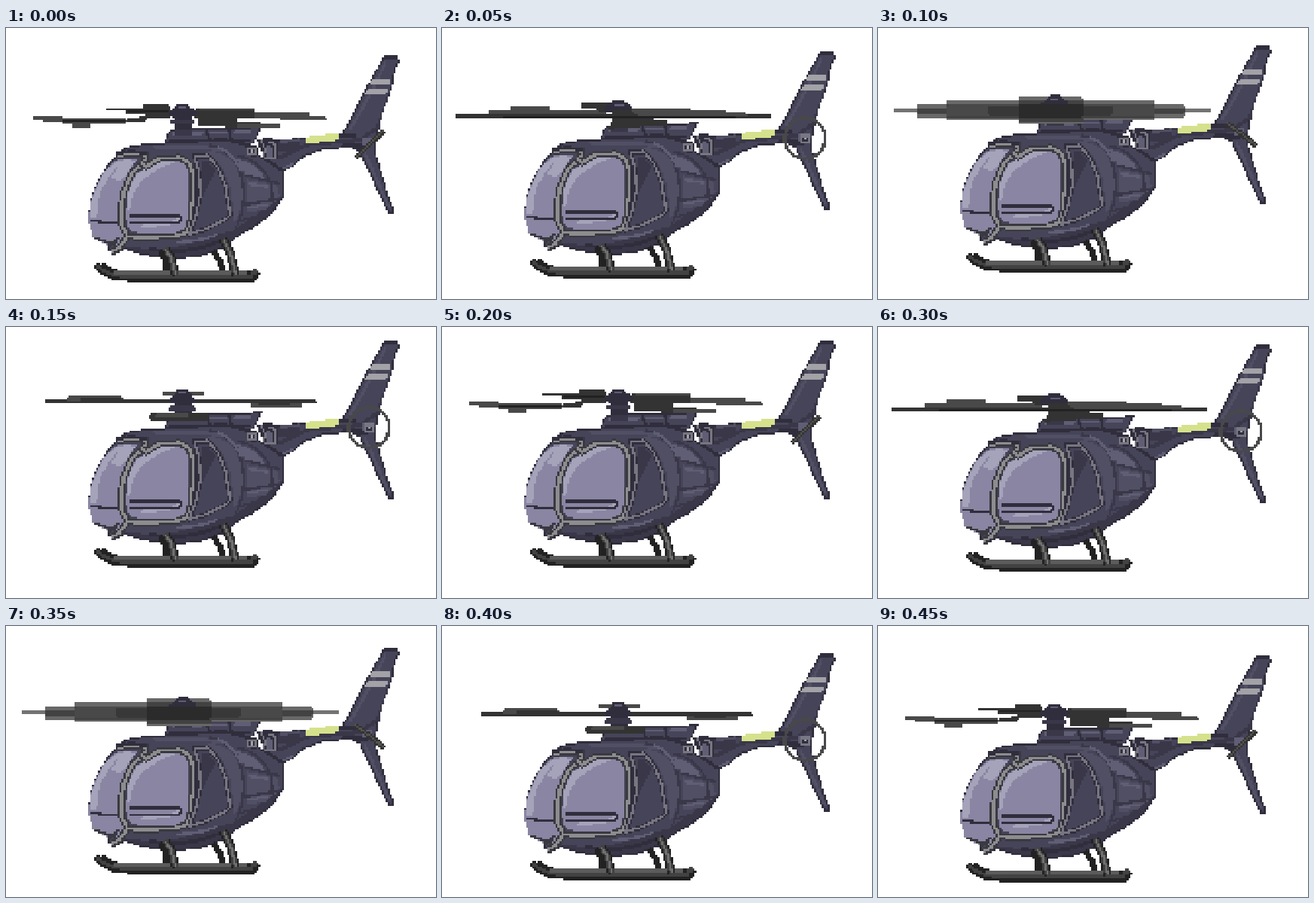
Animation of 571x360 px, one loop 500 ms. Source, as an HTML page with a canvas:

```html
<!DOCTYPE html>
<html lang="en">
<head>
<meta charset="utf-8">
<title>Helicopter</title>
<style>
html, body { margin: 0; width: 100%; height: 100%; overflow: hidden; background: #fff; }
canvas { display: block; }
</style>
</head>
<body>
<canvas id="stage" width="571" height="360"></canvas>
<script>
const CELL = 2.6, COLS = 220, ROWS = 144;
const STEP = 50;
const LIFT = [0, -2, -5, -7, -7, -6, -5, -3, 0, 1];
const SPIN = ['star', 'wide', 'blur', 'flat', 'star'];
const TAIL = { star: 'rise', wide: 'ring', blur: 'fall', flat: 'ring' };

const C = {
  edge: '#302e3c', dark: '#393748', body: '#464458', mid: '#514f63', light: '#605e74',
  glass: '#8985a2', shine: '#a5a3ba', frame: '#8d8d8f', rim: '#393940', seam: '#777681',
  black: '#222222', metal: '#424242', steel: '#5b5b5b', blade: '#333333', bladeLight: '#494949',
  band: '#a2a2a7', lime: '#d6e18c'
};

function makeCanvas() {
  const canvas = document.createElement('canvas');
  canvas.width = COLS;
  canvas.height = ROWS;
  return canvas;
}

const scratch = makeCanvas();
const pen = scratch.getContext('2d', { willReadFrequently: true });

// Draws a path with hard, un-antialiased cells.
function layer(draw) {
  const canvas = makeCanvas(), out = canvas.getContext('2d');
  const stamp = (color, path, width, inside) => {
    pen.setTransform(1, 0, 0, 1, 0, 0);
    pen.clearRect(0, 0, COLS, ROWS);
    pen.scale(1 / CELL, 1 / CELL);
    pen.lineJoin = 'round';
    pen.fillStyle = pen.strokeStyle = color;
    const shape = new Path2D(path);
    if (width) {
      pen.lineWidth = width;
      pen.stroke(shape);
    } else pen.fill(shape);
    const image = pen.getImageData(0, 0, COLS, ROWS), px = image.data;
    const [r, g, b] = [1, 3, 5].map(i => parseInt(color.slice(i, i + 2), 16));
    for (let i = 0; i < px.length; i += 4) {
      if (px[i + 3] > 115) {
        px[i] = r; px[i + 1] = g; px[i + 2] = b; px[i + 3] = 255;
      } else px[i + 3] = 0;
    }
    pen.putImageData(image, 0, 0);
    out.globalCompositeOperation = inside ? 'source-atop' : 'source-over';
    out.drawImage(scratch, 0, 0);
  };
  draw({
    fill: (color, path) => stamp(color, path),
    line: (color, path, width) => stamp(color, path, width),
    shade: (color, path, width) => stamp(color, path, width, true),
    box: (color, x1, y1, x2, y2) => stamp(color, `M${x1} ${y1}H${x2}V${y2}H${x1}Z`)
  });
  return canvas;
}

function drawTail({ fill, line, shade }) {
  const fin = 'M501 38H520L523 45L517 54L514 75L508 92L499 115L495 135L490 162L500 197L511 233L515 239V247H508L499 228L484 196L469 164L458 159H446L420 162L396 171L382 184L366 192L340 186L344 149L396 146L447 139L455 125L469 98L481 74L493 53Z';
  fill(C.body, fin);
  shade(C.edge, fin, 4);
  shade(C.mid, 'M504 46L488 79L465 121L456 135', 4);
  shade(C.dark, 'M508 92L494 132L470 149L400 155L360 174', 5);
  shade(C.mid, 'M476 165L493 203L509 240', 4);
  fill(C.edge, 'M440 140H466V144H440ZM444 153H482V160H460Z');
  fill(C.light, 'M474 146H486V156H474Z');
  fill(C.band, 'M486 69H511L509 76H482ZM480 81H507L504 89H476Z');
  fill(C.lime, 'M398 145L441 140V149L415 152H398Z');
  line(C.light, 'M366 187L382 180', 3);
}

function drawCowl({ fill, line, shade, box }) {
  const cowl = 'M210 153L215 139L224 134H266L296 132H325L341 129L335 142L329 154L300 158H215Z';
  fill(C.body, cowl);
  shade(C.edge, cowl, 4);
  line(C.light, 'M221 140H262M270 139H293M302 138H326', 3);
  line(C.edge, 'M266 135L271 151M296 134L300 151M215 149H326', 3);
  box(C.dark, 224, 134, 246, 143);
}

function drawHull({ fill, line, shade }) {
  const hull = 'M147 168L160 158L185 154L240 151L290 148L317 154L341 172L368 190L370 222L352 248L332 263L306 278L291 291L257 304L215 307L180 301L159 294L146 300L136 296L137 289L116 278L110 255L111 233L119 210L132 185Z';
  fill(C.body, hull);
  shade(C.dark, 'M155 290Q220 300 266 278L301 270L368 223V260L290 310H155Z');
  shade(C.edge, hull, 4);
  shade(C.mid, 'M266 164Q290 164 303 181L315 207L314 235L303 260L299 214L286 183Z');
  shade(C.light, 'M306 174Q326 177 337 191L347 203L319 195Z');
  shade(C.mid, 'M319 201L361 210L363 224L348 240L319 246Z');
  line(C.dark, 'M270 155Q298 163 309 184Q321 217 311 253L302 274M307 170Q333 172 351 202L355 233L344 248M316 195L365 207M315 235L361 227M310 256L340 249', 3);
  line(C.light, 'M280 157Q302 167 313 191M323 207L350 211M321 239L348 234', 3);
  shade(C.mid, 'M196 158H262L285 163', 4);
  line(C.edge, 'M190 293Q240 303 286 282', 4);
  line(C.light, 'M227 284Q257 284 281 274', 3);
}

function drawMount({ fill, line, box }) {
  fill(C.edge, 'M333 148L351 145L360 151L361 175L342 171Z');
  line(C.seam, 'M338 148L344 160L342 171M349 151L357 155V174M343 173H357', 3);
  fill(C.light, 'M347 155L354 159V171H346Z');
  box(C.dark, 362, 151, 391, 163);
  line(C.mid, 'M364 151L390 149', 4);
  fill(C.edge, 'M319 159L325 156H332L336 162V168L329 172L321 169Z');
  line(C.seam, 'M322 160H332V168H322Z', 3);
  line(C.band, 'M327 162V166', 3);
}

function drawCabin({ fill, line }) {
  const nose = 'M148 175L176 173L163 190L154 215L152 243L154 264L160 277L151 289L138 290L116 278L110 258L111 235L119 212L131 189Z';
  const pane = 'M190 183L206 175L226 174L239 181L242 194V246L238 265L226 273L174 272L163 267L159 249L162 217L172 194Z';
  fill(C.glass, nose);
  fill(C.shine, 'M148 176L168 175L151 198L134 201L123 226L120 253H112V235L120 212L132 190Z');
  fill(C.glass, 'M148 183L137 198L126 216L121 249L127 268L152 264V225Z');
  fill(C.shine, 'M157 176H172L158 196L151 205L139 198Z');
  fill(C.glass, pane);
  fill(C.shine, 'M190 184L206 176H226L217 181L198 190L181 202L169 220L165 241H160L163 214L173 195Z');
  line(C.shine, 'M180 263L215 262L235 251', 3);
  line(C.edge, 'M111 256L153 260M163 250H232M164 258H230L234 251', 3);
  line(C.rim, 'M117 278L138 286L151 279M134 291L147 284', 3);
  const front = 'M148 169L165 167L186 168L185 179L169 190Q153 215 153 245L154 263L162 276L152 290L140 298';
  const window = 'M162 276L174 278L223 277L240 272L246 256L248 229V194L244 180L231 172L205 173L186 184L179 179';
  for (const path of [front, window]) {
    line(C.rim, path, 9);
    line(C.frame, path, 4);
  }
  line(C.edge, 'M146 167L166 164L188 167', 4);
  line(C.edge, 'M251 176L253 211L249 252L242 275', 4);
  const door = 'M250 170L268 169L282 186L291 209L298 248L290 255L263 268L243 274L252 249L258 222L257 194Z';
  fill(C.body, door);
  fill(C.dark, 'M261 177L268 176L278 190L260 225Z');
  line(C.edge, door, 6);
  line(C.seam, door, 2.8);
}

function drawSkids({ line }) {
  line(C.black, 'M204 296L213 309V325M275 296L284 309L288 325', 8);
  line(C.black, 'M128 314L138 321L151 325H326', 6);
  line(C.black, 'M119 315L131 324L145 330L164 332H329L334 323', 10);
  line(C.metal, 'M119 315L131 323L146 329L166 331H328', 4);
  line(C.steel, 'M141 325H320', 2.6);
  for (const path of ['M211 293L219 304L225 328', 'M288 280L298 299L305 328']) {
    line(C.black, path, 11);
    line(C.metal, path, 7);
    line('#707070', path, 2.8);
  }
  line(C.metal, 'M326 324H334', 6);
}

function drawHub({ fill, box, line }) {
  box(C.edge, 224, 114, 246, 134);
  box(C.dark, 219, 123, 250, 128);
  fill(C.edge, 'M216 112L222 107L228 102H241L247 107L254 111V116L246 119H224L216 116Z');
  line(C.light, 'M229 106H240', 2.6);
}

const rotors = {
  star: layer(art => {
    const { fill, line } = art;
    fill(C.blade, 'M133 107H183V102H217V120H186L184 125H160V121L185 117V113H158V110H133Z');
    fill(C.bladeLight, 'M36 118H76V120H160V126H112V132H89V128H76V124H49V121H36Z');
    line(C.black, 'M76 124H160M160 110H217', 2.6);
    fill(C.blade, 'M250 108H330V113H368V120H300L274 122L250 118Z');
    fill(C.bladeLight, 'M330 113H400V112H404V118H425V122H365V118H330Z');
    fill(C.blade, 'M254 120H306V125H337V128H364V132H290V129H254Z');
    line(C.bladeLight, 'M256 109H330M306 130H364', 2.6);
    drawHub(art);
  }),
  wide: layer(({ fill, line, box }) => {
    box(C.blade, 18, 120, 437, 125);
    fill(C.bladeLight, 'M62 115H90V110H142V115H218V120H62Z');
    fill(C.blade, 'M184 105H222L250 110V116H206V111H184Z');
    fill(C.bladeLight, 'M250 111H330V115H376V118H405V122H250Z');
    fill(C.edge, 'M216 111L225 103H242L252 110V116H216Z');
    fill(C.blade, 'M227 115H250L265 124L300 129V136H270L220 140L225 132Z');
    line(C.light, 'M228 107H242', 2.6);
    line(C.black, 'M80 123H390', 2.6);
  }),
  blur: layer(({ fill, box, line }) => {
    box('#737373', 20, 120, 441, 124);
    for (const [x1, y1, x2, y2] of [[51, 115, 407, 131], [92, 110, 366, 136], [187, 105, 272, 141]]) {
      box('#686868', x1, y1, x2, y2);
      box(C.metal, x1, y1 + 4, x2, y2 - 4);
    }
    box(C.bladeLight, 92, 116, 366, 130);
    box('#383838', 146, 117, 311, 129);
    box('#2b2b2b', 187, 115, 272, 131);
    fill(C.edge, 'M216 114L222 109L229 103H241L247 108L253 112V115H216Z');
    line(C.light, 'M229 107H241', 2.6);
  }),
  flat: layer(({ fill, box, line }) => {
    box(C.blade, 52, 116, 412, 120);
    box(C.bladeLight, 82, 110, 155, 117);
    box(C.blade, 99, 113, 155, 118);
    box(C.bladeLight, 324, 119, 392, 124);
    box(C.blade, 334, 118, 377, 121);
    box(C.edge, 224, 108, 246, 136);
    box(C.edge, 217, 113, 251, 119);
    box(C.dark, 217, 123, 251, 130);
    box(C.bladeLight, 208, 105, 262, 109);
    fill(C.edge, 'M222 109L228 102H241L247 108V112H222Z');
    line(C.light, 'M229 105H240', 2.6);
    box(C.blade, 191, 134, 269, 142);
    box(C.bladeLight, 198, 134, 243, 137);
  })
};

const bar = path => layer(({ line }) => {
  line(C.blade, path, 7);
  line('#54524f', path, 2.6);
});
const tails = {
  rise: bar('M465 172L482 155L502 136'),
  fall: bar('M463 139L482 153L503 170'),
  ring: layer(({ line, box }) => {
    line('#48484a', 'M455 152A27 27 0 1 1 509 152A27 27 0 1 1 455 152', 3.7);
    box('#777785', 475, 146, 488, 158);
    box(C.edge, 478, 150, 486, 156);
    box(C.band, 481, 151, 484, 154);
  })
};

const body = layer(art => {
  for (const part of [drawTail, drawCowl, drawHull, drawMount, drawCabin, drawSkids]) part(art);
});

const ctx = document.getElementById('stage').getContext('2d');

function render(now) {
  const step = Math.floor(now / STEP) % LIFT.length;
  const spin = SPIN[step % SPIN.length];
  ctx.fillStyle = '#fff';
  ctx.fillRect(0, 0, 571, 360);
  ctx.imageSmoothingEnabled = false;
  for (const sprite of [body, tails[TAIL[spin]], rotors[spin]]) {
    ctx.drawImage(sprite, 0, LIFT[step] * CELL, COLS * CELL, ROWS * CELL);
  }
}

const start = performance.now();
function tick() {
  render(performance.now() - start);
  requestAnimationFrame(tick);
}
tick();
</script>
</body>
</html>
```
